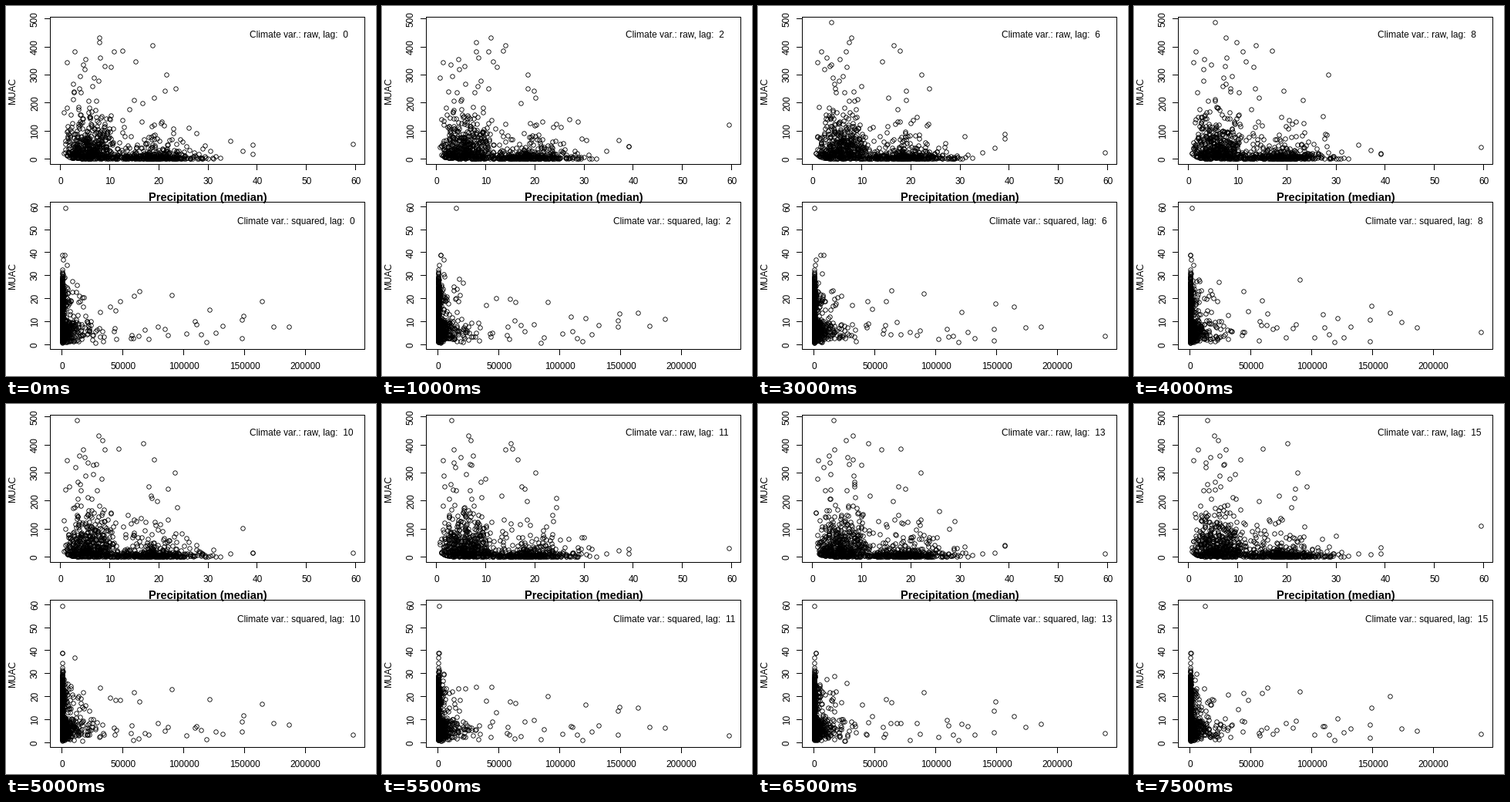
These frames come from a looping animation (480 px wide and 480 px high, 8 s). A matplotlib script:

```python
import numpy as np
import matplotlib.pyplot as plt
from matplotlib.animation import FuncAnimation

SIZE = 480
LAGS = 16
STEP_MS = 500

plt.rcParams.update({
    "font.family": "Liberation Sans",
    "text.hinting": "native",
    "text.hinting_factor": 8,
    "toolbar": "None",
})

# The highest counts with their usual rainfall, and the wettest readings.
PEAKS = [(489, 3.2), (432, 7.5), (417, 6.8), (405, 17), (386, 15), (384, 9),
         (355, 4.5), (344, 1.1), (338, 4), (330, 8.4), (320, 3.3), (300, 24)]
WETTEST = [59.5, 39, 39, 37, 34.5]
N_DRY, N_WET = 480, 420

# Two climates: a dry one with high counts, a wet one with low counts.
pool = np.random.default_rng(7)
dry_rain = 0.5 + 10.8 * pool.beta(1.9, 2.0, N_DRY)
dry_count = pool.gamma(0.85, 58, N_DRY)
wet_rain = np.clip(pool.normal(18.5, 5, N_WET), 3, 32.5)
wet_count = pool.exponential(np.where(pool.random(N_WET) < 0.66, 9, 52))


def pairs(lag):
    """Rainfall and counts at one lag: the same values, paired anew."""
    rng = np.random.default_rng(100 + lag)
    peak_count, peak_rain = np.array(PEAKS).T
    peak_rain = peak_rain * rng.lognormal(0, 0.18, len(PEAKS))
    if lag < 6:
        peak_count, peak_rain = peak_count[1:], peak_rain[1:]
    dry = rng.permutation(dry_rain)
    wet = rng.permutation(wet_rain)
    rain = np.r_[peak_rain, WETTEST, dry, wet]
    count = np.r_[peak_count,
                  4 + rng.exponential(35, len(WETTEST)),
                  np.maximum(dry_count, 42 * np.exp(-dry)),
                  wet_count * np.clip((35 - wet) / 10, 0.25, 1)]
    return rain, count


fig = plt.figure(figsize=(SIZE / 72, SIZE / 72), dpi=72, facecolor="white")
ax = fig.add_axes([0, 0, 1, 1])
ax.set(xlim=(0, SIZE), ylim=(SIZE, 0))
ax.axis("off")


def stroke(xs, ys):
    """One-pixel line through pixel centres."""
    ax.plot(np.floor(xs) + 0.5, np.floor(ys) + 0.5, color="black", lw=1,
            solid_capstyle="projecting", solid_joinstyle="miter", snap=False)


def label(x, y, text, size=12, **kw):
    return ax.text(x, y, text, fontsize=size, color="black",
                   va="baseline", rotation_mode="anchor", **kw)


class Panel:
    """Scatter plot frame with its own pixel scale."""

    def __init__(self, top, x0, x_scale, y0, y_scale, x_ticks, y_ticks):
        self.x0, self.x_scale = x0, x_scale
        self.y0, self.y_scale = y0, y_scale
        left, right, bottom = 57, 465, top + 191
        stroke([left, right, right, left, left], [top, top, bottom, bottom, top])
        for v in x_ticks:
            x = self.px(v)
            stroke([x, x], [bottom, bottom + 7])
            label(x, bottom + 26, str(v), ha="center")
        for v in y_ticks:
            y = self.py(v)
            stroke([left - 7, left], [y, y])
            label(41, y, str(v), ha="center", rotation=90)
        label(12, top + 96, "MUAC", ha="center", rotation=90)
        self.dots, = ax.plot([], [], "o", ms=5.5, mew=0.85,
                             mfc="none", mec="black")

    def px(self, v):
        return self.x0 + v * self.x_scale

    def py(self, v):
        return self.y0 - v * self.y_scale

    def show(self, xs, ys):
        self.dots.set_data(self.px(xs), self.py(ys))


raw = Panel(14, 70.6, 6.383, 198.3, 0.363,
            range(0, 61, 10), range(0, 501, 100))
squared = Panel(254, 72.6, 0.00158, 439.3, 2.983,
                range(0, 200001, 50000), range(0, 61, 10))
label(262, 253, "Precipitation (median)", 14.6, ha="center", weight="bold")
raw_note = label(316.5, 41, "")
squared_note = label(300.5, 283, "")


def draw(lag):
    rain, count = pairs(lag)
    raw.show(rain, count)
    squared.show(count ** 2, rain)
    raw_note.set_text(f"Climate var.: raw, lag:  {lag}")
    squared_note.set_text(f"Climate var.: squared, lag:  {lag}")
    return raw.dots, squared.dots, raw_note, squared_note


anim = FuncAnimation(fig, draw, frames=LAGS, interval=STEP_MS,
                     repeat=True, repeat_delay=0, blit=False)
plt.show()
```
